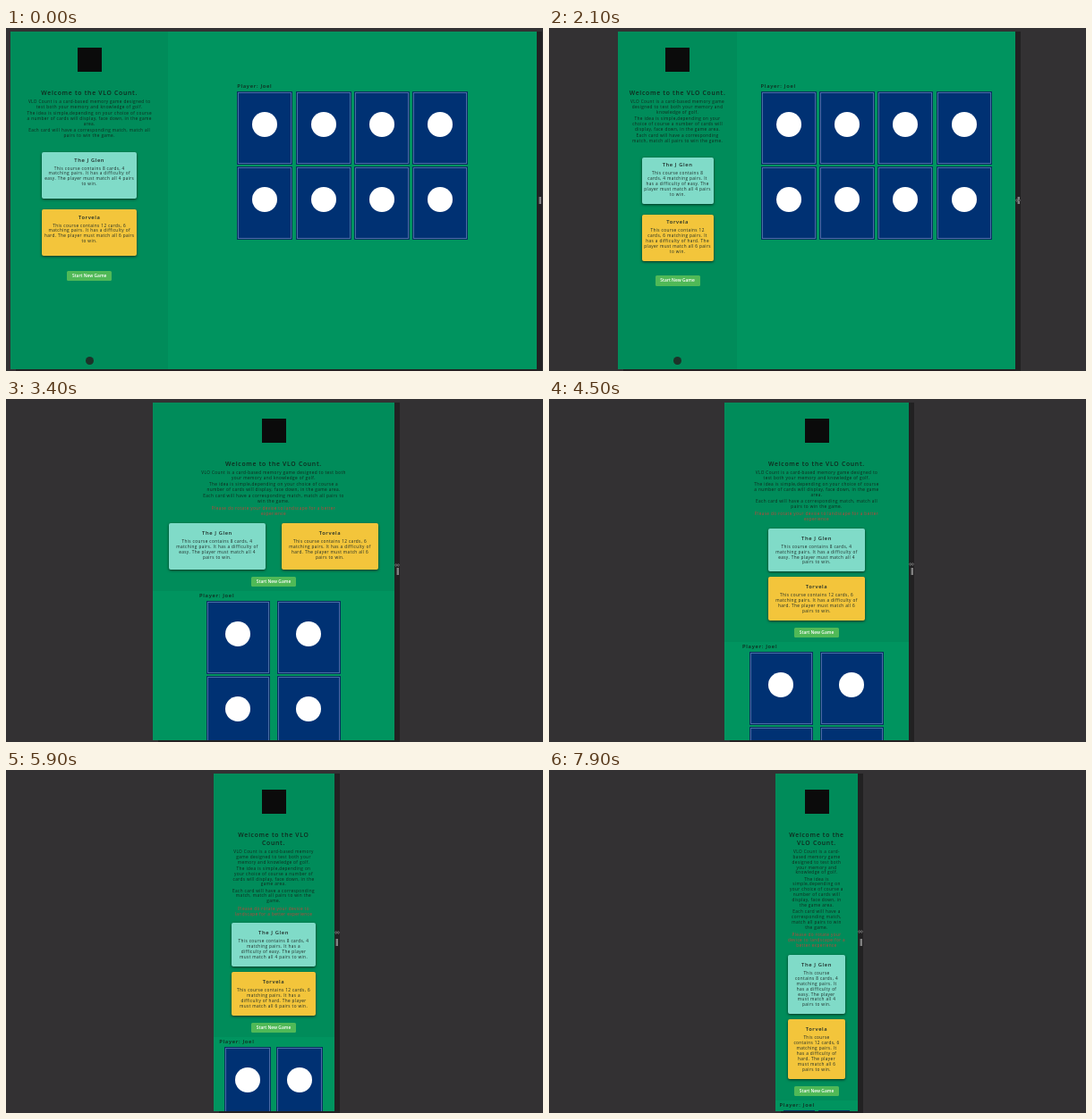
These frames come from a looping animation (600x384 px, 8 s). An HTML page:

```html
<!DOCTYPE html>
<html lang="en">
<head>
<meta charset="utf-8">
<title>Responsive card game</title>
<style>
* { box-sizing: border-box; margin: 0; padding: 0; }
html, body { width: 100%; height: 100%; overflow: hidden; background: #333133; }
body { position: relative; font: 4.7px/5.9px "Open Sans", sans-serif; letter-spacing: .4px; color: #10281d; }

#page {
  position: absolute; top: 4px; height: 377.5px; overflow: hidden;
  container-type: inline-size; background: #00945f;
  box-shadow: 6px 0 #222122, 6px 3px #222122;
}
aside { position: absolute; width: 30cqw; height: 100%; padding-top: 63.5px; background: #008c5a; text-align: center; }
.logo { position: absolute; top: 18px; left: calc(50% - 13.5px); width: 27px; height: 27px; background: #0b0b0b; }
.icon { position: absolute; top: 363.5px; left: calc(50% - 4.5px); width: 9px; height: 9px; border-radius: 50%; background: #1c3329; }
h1, p.copy { width: 24.3cqw; margin: 0 auto 1.2px; }
h1 { margin-bottom: 3.3px; font-size: 6.8px; line-height: 9px; font-weight: 600; letter-spacing: .73px; }
p.note { display: none; margin-top: 2.4px; color: #c0453a; }

.courses { display: flex; flex-direction: column; align-items: center; gap: 12px; margin-top: 15.5px; }
article { width: 18cqw; min-height: 52px; padding: 4.5px 2px; border-radius: 2px; background: #80dbc8; color: #1c2926; box-shadow: 0 1px 3px rgba(0, 0, 0, .65); }
article + article { background: #f3c53b; }
h2 { margin-bottom: 3px; font-size: 5.8px; line-height: 8px; font-weight: 600; letter-spacing: .6px; }
button {
  display: block; width: 50px; height: 11.5px; margin: 16.5px auto 0; border: 0; border-radius: 1.5px;
  background: #50b957; color: #fff; font: 600 4.9px/11.5px "Open Sans", sans-serif;
}

main { position: absolute; left: 30cqw; width: 70cqw; padding-top: 56px; }
.game { width: 258px; margin: 0 auto; }
.player { font-size: 5.8px; line-height: 11px; font-weight: 600; letter-spacing: .7px; white-space: nowrap; }
.grid { display: grid; grid-template-columns: repeat(4, 62px); grid-auto-rows: 82px; gap: 2px 3.33px; }
.card { position: relative; background: #003173; border: 1px solid #04305f; box-shadow: inset 0 0 0 1px #4a6ca6; }
.card::after { content: ""; position: absolute; left: 50%; top: 36px; width: 28px; height: 28px; border-radius: 50%; background: #fff; transform: translate(-50%, -50%); }

@container (max-width: 345px) {
  aside, main { position: relative; left: 0; width: 100%; height: auto; }
  aside { padding-bottom: 4.5px; }
  main { padding-top: 0; }
  .icon { display: none; }
  p.note { display: block; }
  h1, p.copy { width: 60.7cqw; }
  .courses { flex-direction: row; justify-content: center; align-items: stretch; gap: 6.7cqw; margin-top: 7px; }
  article { width: 40cqw; padding: 7px 6px; }
  button { margin-top: 8px; }
  .game { width: min(166px, 90cqw); }
  .grid { grid-template-columns: 42.5% 42.5%; column-gap: 5.1%; justify-content: center; }
}
@container (max-width: 221px) {
  h1, p.copy { width: 70cqw; }
  .courses { flex-direction: column; align-items: center; gap: 6px; }
  article { width: 52cqw; min-height: 0; }
}
@container (max-width: 165px) {
  article { width: 70cqw; }
}

#grip { position: absolute; top: 189px; width: 3px; height: 8px; background: #808080; border-left: 1px solid #4a4a4a; }
#cursor { position: absolute; width: 6px; height: 4px; overflow: visible; }
</style>
</head>
<body>
<div id="page">
  <aside>
    <i class="logo"></i>
    <h1>Welcome to the VLO Count.</h1>
    <p class="copy">VLO Count is a card-based memory game designed to test both your memory and knowledge of golf.</p>
    <p class="copy">The idea is simple,depending on your choice of course a number of cards will display, face down, in the game area.</p>
    <p class="copy">Each card will have a corresponding match, match all pairs to win the game.</p>
    <p class="copy note">Please do rotate your device to landscape for a better experience</p>
    <div class="courses">
      <article><h2>The J Glen</h2><p>This course contains 8 cards,&nbsp;4 matching pairs. It has a difficulty of easy. The player must match all 4 pairs to win.</p></article>
      <article><h2>Torvela</h2><p>This course contains 12 cards,&nbsp;6 matching pairs. It has a difficulty of hard. The player must match all 6 pairs to win.</p></article>
    </div>
    <button>Start New Game</button>
    <i class="icon"></i>
  </aside>
  <main>
    <div class="game">
      <div class="player">Player: Joel</div>
      <div class="grid"></div>
    </div>
  </main>
</div>
<div id="grip"></div>
<svg id="cursor" viewBox="0 0 7 5">
  <path d="M0 2.5 2 .5V2H5V.5L7 2.5 5 4.5V3H2V4.5Z" fill="#222" stroke="#999" stroke-width=".6"/>
</svg>
<script>
const LOOP = 8000, STEP = 100, CENTER = 299;
// [time, value] points
const HALF = [[0, 294], [1300, 294], [1800, 241], [2100, 222], [2700, 167], [3400, 135], [3600, 129],
  [4500, 103], [5400, 77], [5900, 67.5], [7200, 67.5], [7900, 46]];
const CURSOR_Y = [[0, 193], [2100, 193], [3400, 186], [4500, 185], [5900, 182], [7900, 181]];

const page = document.getElementById('page');
const grip = document.getElementById('grip');
const cursor = document.getElementById('cursor');
document.querySelector('.grid').innerHTML = '<div class="card"></div>'.repeat(8);

function at(points, t) {
  const i = points.findIndex(p => p[0] >= t);
  if (i < 1) return points[i < 0 ? points.length - 1 : 0][1];
  const [t0, a] = points[i - 1], [t1, b] = points[i];
  return a + (b - a) * (t - t0) / (t1 - t0);
}

function draw(now) {
  const t = Math.floor(now % LOOP / STEP) * STEP;
  const half = at(HALF, t), right = CENTER + half;
  page.style.left = CENTER - half + 'px';
  page.style.width = half * 2 + 'px';
  grip.style.left = right + 1.5 + 'px';
  cursor.style.left = right + 'px';
  cursor.style.top = at(CURSOR_Y, t) - 2 + 'px';
  cursor.style.display = t < 1000 ? 'none' : 'block';
}

const start = performance.now();
function tick() {
  draw(performance.now() - start);
  requestAnimationFrame(tick);
}
tick();
</script>
</body>
</html>
```
